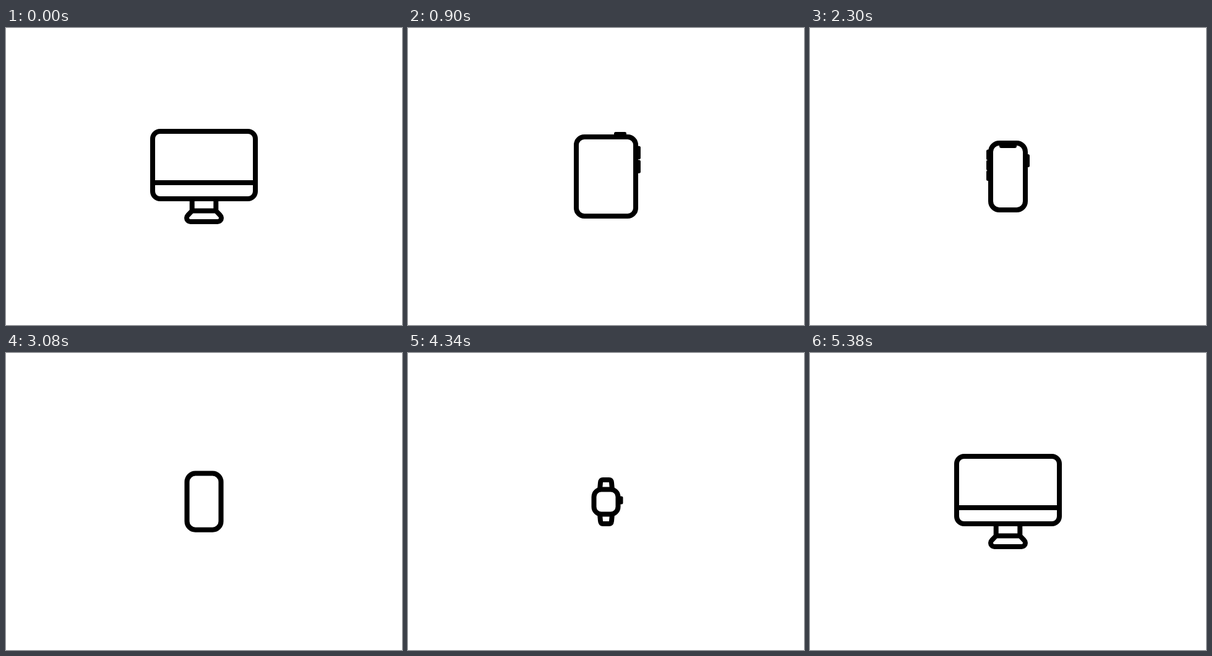
An HTML page with a canvas for the animation above (5.47 s loop, 640 px wide and 480 px high).

```html
<!DOCTYPE html>
<html lang="en">
<head>
<meta charset="utf-8">
<title>Device morph</title>
<style>
  html, body { margin: 0; width: 100%; height: 100%; overflow: hidden; background: #fff; }
  canvas { display: block; width: 640px; height: 480px; }
</style>
</head>
<body>
<canvas id="stage" width="640" height="480"></canvas>
<script>
const LOOP = 5470, STEP = 70, LINE = 8, TURN = Math.PI * 1.5;
const ctx = document.getElementById('stage').getContext('2d');

// Centre line of each device body.
const monitor = { w: 166, h: 109, y: 221.5, r: 12 };
const tablet = { w: 96, h: 128, y: 240, r: 13 };
const phone = { w: 56, h: 108, y: 240, r: 14 };
const watch = { w: 39, h: 40, y: 240.5, r: 12 };
// The watch grows upright while it spins into the landscape monitor.
const upright = { ...monitor, w: monitor.h, h: monitor.w };

const moves = [
  { to: tablet, start: 400, span: 320, lag: 0 },
  { to: phone, start: 1820, span: 350, lag: 0 },
  { to: watch, start: 2960, span: 330, lag: 0 },
  { to: upright, start: 4580, span: 500, lag: 50 }
];

const progress = (t, start, span) => Math.min(1, Math.max(0, (t - start) / span));
const easeInOut = (u, p) => u < .5 ? (2 * u) ** p / 2 : 1 - (2 - 2 * u) ** p / 2;
const ramp = (t, start, span, p = 2) => easeInOut(progress(t, start, span), p);
const show = (t, on, off, span = 210) => ramp(t, on, span) - ramp(t, off, span);
const bump = (t, start, span) => Math.sin(Math.PI * progress(t, start, span));

// Width follows a sharper curve than the other measures.
function bodyAt(t) {
  const body = { ...monitor };
  for (const { to, start, span, lag } of moves) {
    const soft = ramp(t, start, span), sharp = ramp(t, start + lag, span, 5);
    for (const key in body) body[key] += (to[key] - body[key]) * (key === 'w' ? sharp : soft);
  }
  return body;
}

function scoped(draw) {
  ctx.save();
  draw();
  ctx.restore();
}

function box(x, y, w, h, r) {
  ctx.beginPath();
  ctx.roundRect(x, y, w, h, r);
}

// A button on the right (side 1) or left (side -1) edge.
function sideKey(side, w, y, len, out) {
  if (out < .1) return;
  scoped(() => {
    ctx.scale(side, 1);
    box(w / 2 - 2, y - len / 2, out + 6, len, 2.5);
    ctx.fill();
  });
}

function topKey(h, x, len, out) {
  scoped(() => {
    ctx.rotate(-Math.PI / 2);
    sideKey(1, h, x, len, out);
  });
}

function drawKeys(t, w, h) {
  const tab = 4 * show(t, 720, 1750), ph = 3 * show(t, 2050, 2880);
  topKey(h, 23, 20, tab);
  for (const y of [-38.5, -16]) sideKey(1, w, y, 21.5, tab);
  for (const y of [-35, -18.25, -1.5]) sideKey(-1, w, y, 17, ph);
  sideKey(1, w, -25.5, 21, ph);
  sideKey(1, w, -2.5, 13, 4 * show(t, 3140, 4725));
}

function drawBand(side, h, k) {
  if (k < .01) return;
  scoped(() => {
    ctx.scale(1, side);
    ctx.translate(0, -h / 2 + 18 * (1 - k));
    ctx.beginPath();
    ctx.moveTo(-10, 0);
    ctx.lineTo(-9, -11);
    ctx.quadraticCurveTo(-8.5, -15.5, -5, -15.5);
    ctx.lineTo(5, -15.5);
    ctx.quadraticCurveTo(8.5, -15.5, 9, -11);
    ctx.lineTo(10, 0);
    ctx.stroke();
  });
}

function drawStand(k) {
  if (k < .01) return;
  scoped(() => {
    ctx.translate(320, -45 * (1 - k));
    ctx.beginPath();
    for (const x of [-19.3, 19.3]) {
      ctx.moveTo(x, 272);
      ctx.lineTo(x, 295.5);
    }
    ctx.moveTo(-19.3, 295.5);
    ctx.lineTo(19.3, 295.5);
    ctx.arc(22, 307, 6, -Math.PI / 4, Math.PI / 2);
    ctx.arc(-22, 307, 6, Math.PI / 2, Math.PI * 1.25);
    ctx.closePath();
    ctx.stroke();
  });
}

function drawChin(t, turned, { w, h, r }) {
  const rise = 26 * (1 - ramp(t, 400, 205) + ramp(t, 4950, 160));
  if (rise < 1) return;
  scoped(() => {
    box(-w / 2, -h / 2, w, h, r);
    ctx.clip();
    if (turned) {
      ctx.rotate(-TURN);
      [w, h] = [h, w];
    }
    ctx.fillRect(-w / 2, h / 2 - rise - LINE / 2, w, LINE);
  });
}

function drawNotch(h, k) {
  if (k < .01) return;
  box(-14, -h / 2, 28, 8 * k, [0, 0, 3, 3]);
  ctx.fill();
}

function drawBody(t) {
  const body = bodyAt(t), { w, h, y, r } = body;
  const spin = ramp(t, 4550, 465), bands = show(t, 3140, 4550);
  ctx.translate(320, y);
  ctx.rotate(TURN * spin);
  drawKeys(t, w, h);
  drawBand(1, h, bands);
  drawBand(-1, h, bands);
  box(-w / 2, -h / 2, w, h, r);
  ctx.fillStyle = '#fff';
  ctx.fill();
  ctx.stroke();
  ctx.fillStyle = '#000';
  drawChin(t, spin > 0, body);
  drawNotch(h, show(t, 2050, 2880));
}

function render(now) {
  // The motion advances in short, even holds.
  const t = Math.floor((now % LOOP + 10) / STEP) * STEP;
  ctx.fillStyle = '#fff';
  ctx.fillRect(0, 0, 640, 480);
  ctx.fillStyle = ctx.strokeStyle = '#000';
  ctx.lineWidth = LINE;
  ctx.lineJoin = 'round';
  scoped(() => {
    const zoom = 1 + .05 * bump(t, 2860, 240) + .05 * bump(t, 5000, 250);
    ctx.translate(320, 240);
    ctx.scale(zoom, zoom);
    ctx.translate(-320, -240);
    drawStand(1 - show(t, 500, 4950, 200));
    drawBody(t);
  });
}

const start = performance.now();
function tick() {
  render(performance.now() - start);
  requestAnimationFrame(tick);
}
tick();
</script>
</body>
</html>
```
